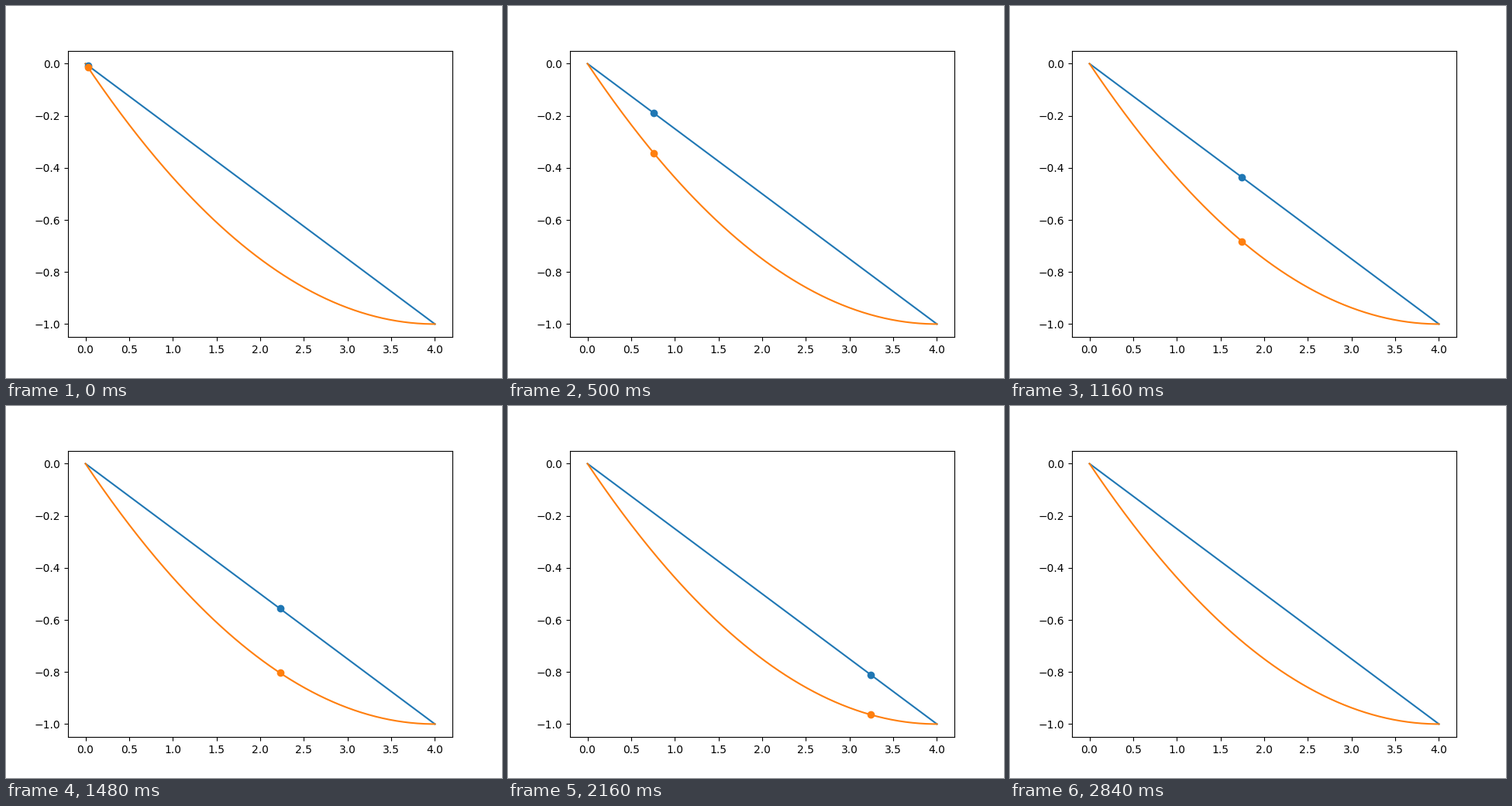
A matplotlib script for the animation above (4520 ms loop, 640 by 480 pixels).

```python
import numpy as np
import matplotlib.pyplot as plt
from matplotlib.animation import FuncAnimation

FRAMES = 226
INTERVAL = 20  # ms
START = 0.03
OFFSET, STEP = 0.0095, 0.029957


def ramp(x):
    return -x / 4


def bowl(x):
    return (x - 4) ** 2 / 16 - 1


def position(i):
    """Shared x of both dots; they run on past the right edge."""
    return max(START, OFFSET + STEP * i)


fig, ax = plt.subplots(figsize=(6.4, 4.8), dpi=100)
paths = (ramp, bowl)
colors = ("#1f77b4", "#ff7f0e")

x = np.linspace(0, 4, 200)
for path, color in zip(paths, colors):
    ax.plot(x, path(x), color=color)
dots = [ax.plot([], [], "o", color=color)[0] for color in colors]

ax.set_xlim(-0.2, 4.2)
ax.set_ylim(-1.05, 0.05)


def update(i):
    px = position(i)
    for dot, path in zip(dots, paths):
        dot.set_data([px], [path(px)])
    return dots


def init():
    return update(0)


anim = FuncAnimation(fig, update, frames=FRAMES, init_func=init,
                     interval=INTERVAL, repeat=True, repeat_delay=0,
                     blit=False)
plt.show()
```
